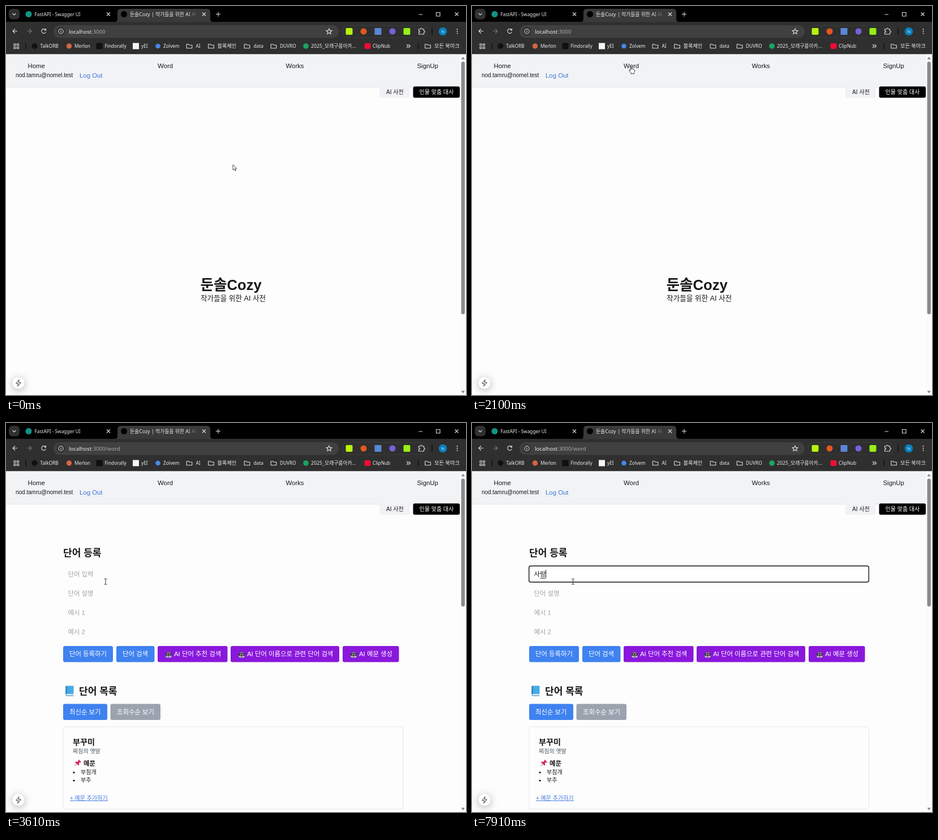
An HTML page that plays this animation: 813x689 px, repeating every 8000 ms.

```html
<!DOCTYPE html>
<html lang="ko">
<head>
<meta charset="utf-8">
<title>Word registration</title>
<style>
  html, body { margin: 0; width: 100%; height: 100%; overflow: hidden; background: #fdfdfd; }
  svg { display: block; width: 100%; height: 100%; }
  text { font-family: "Liberation Sans", "Noto Sans CJK KR", "Noto Sans CJK JP", sans-serif; font-size: 11.4px; fill: #171717; white-space: pre; }
  .ui text { font-family: "Noto Sans", "Noto Sans CJK KR", "Noto Sans CJK JP", sans-serif; font-size: 8.3px; fill: #ededed; }
  .ui .ko { font-size: 9.2px; }
  .ui .mix { font-size: 8.8px; }
  .ui .url { font-size: 9.5px; fill: #f2f2f2; }
  .ui .dim { fill: #a9a9a9; }
  .line { fill: none; stroke: #dedede; stroke-width: 1.1; }
  .small { font-size: 10px; }
  .h1 { font-size: 25.6px; font-weight: 700; }
  .h2 { font-size: 17.07px; font-weight: 700; }
  .h3 { font-size: 14.2px; font-weight: 700; }
  .bold { font-weight: 700; }
  .hint { fill: #a0a3a8; }
  .link { fill: #4078e0; }
  .light text, text.light { fill: #fff; }
</style>
</head>
<body>
<svg viewBox="0 0 813 689">
  <defs>
    <path id="folder" class="line" d="M-4.8-3.2h3.6l1.3 1.4h4.7v5.6h-9.6z" stroke-linejoin="round"/>
    <path id="cross" class="line" d="M-3-3 3 3M3-3-3 3"/>
    <g id="bot">
      <path d="M-5 1a5 5 0 0 1 10 0v2.5q0 2-2 2h-6q-2 0-2-2z" fill="#c6c9d1"/>
      <path d="M-4-2.5Q0-7.5 4-2.5z" fill="#6c6870"/>
      <rect x="-5.6" y="-2.2" width="11.2" height="4.6" rx="1.8" fill="#35323c"/>
      <circle cx="-2" cy="0" r="1" fill="#e9edf2"/><circle cx="2" cy="0" r="1" fill="#e9edf2"/>
      <path d="M-2 4h4" stroke="#5b5862"/>
    </g>
    <linearGradient id="tabFade" x1="0" x2="1">
      <stop offset="0" stop-color="#3a3a3a" stop-opacity="0"/><stop offset="1" stop-color="#3a3a3a"/>
    </linearGradient>
    <linearGradient id="edge" x1="0" x2="0" y1="0" y2="1">
      <stop offset="0" stop-color="#dfe1e4"/><stop offset="1" stop-color="#fdfdfd"/>
    </linearGradient>
    <filter id="soft" x="-100%" y="-100%" width="300%" height="300%"><feGaussianBlur stdDeviation="6"/></filter>
  </defs>

  <rect width="813" height="689" fill="#fdfdfd"/>

  <!-- Browser window -->
  <g class="ui">
    <rect width="813" height="29" fill="#000"/>
    <rect y="28" width="813" height="57.5" fill="#2f2f2f"/>
    <path d="M191 28.5q6 0 6-6V11q0-6 6-6h152q6 0 6 6v11.500q0 6 6 6z" fill="#3a3a3a"/>
    <rect x="5" y="5" width="19" height="18.500" rx="6" fill="#303030"/>
    <path class="line" d="M11.500 13l3 3 3-3"/>
    <circle cx="40" cy="14.500" r="5.500" fill="#109485"/>
    <text x="50.500" y="18.300">FastAPI - Swagger UI</text>
    <use href="#cross" x="181" y="14.500"/>
    <circle cx="208.500" cy="14.500" r="5.500" fill="#000"/>
    <text class="mix" x="219" y="18.300">둔솔Cozy | 작가들을 위한 AI 사</text>
    <rect x="320" y="6" width="20" height="20" fill="url(#tabFade)"/>
    <use href="#cross" x="350" y="14.500"/>
    <path class="line" d="M371 14.500h8M375 10.500v8M729.500 15h6.500M760.500 11.500h6.500v6.500h-6.500z"/>
    <use href="#cross" x="796.500" y="14.500"/>

    <path class="line" d="M20 44.500h-8M16 40.500l-4 4 4 4"/>
    <path class="line" d="M37 44.500h8M41 40.500l4 4-4 4" style="stroke:#777"/>
    <path class="line" d="M70 42.300a3.900 3.900 0 1 0 .4 3.600M70.500 40v3h-3"/>
    <rect x="84" y="34" width="504" height="22.500" rx="11.250" fill="#404040"/>
    <circle cx="97" cy="45" r="7.500" fill="#303030"/>
    <circle class="line" cx="97" cy="45" r="4.200"/>
    <path class="line" d="M97 44.300v3M97 42.400v1"/>
    <text class="url" x="111" y="48.500">localhost<tspan class="dim">:3000</tspan><tspan class="dim" id="route">/word</tspan></text>
    <path class="line" d="M571 40.200l1.400 3.200 3.500.3-2.700 2.300.9 3.400-3.100-1.900-3.100 1.900.9-3.400-2.700-2.300 3.500-.3z"/>
    <rect x="594.500" y="34.500" width="151" height="21.500" rx="10.750" fill="none" stroke="#3c3c3c"/>
    <rect x="600.500" y="39" width="12" height="12" rx="2" fill="#b6f20c"/>
    <circle cx="632" cy="45" r="5.500" fill="#e2571f"/>
    <rect x="651.500" y="39" width="12" height="12" rx="1" fill="#5a87d6"/>
    <circle cx="683" cy="45" r="5.500" fill="#7064dc"/>
    <rect x="702.500" y="39" width="12" height="12" rx="2" fill="#97ef16"/>
    <path class="line" d="M729.500 41h3q0-2 1.500-2t1.500 2h3v3q2 0 2 1.500t-2 1.500v3h-9v-3.300q2 0 2-1.300t-2-1.300z"/>
    <path d="M753 39v12" stroke="#111" stroke-width="1.500"/>
    <circle cx="772" cy="45" r="7.300" fill="#087fbd"/>
    <text x="772" y="47.800" text-anchor="middle" style="font-size:7.500px">N</text>
    <g fill="#e4e4e4"><circle cx="797.500" cy="41" r="1"/><circle cx="797.500" cy="44.700" r="1"/><circle cx="797.500" cy="48.400" r="1"/></g>

    <path class="line" d="M14 67h3v3h-3zM19.500 67h3v3h-3zM14 72.500h3v3h-3zM19.500 72.500h3v3h-3z"/>
    <path d="M35 65.500v11M728.500 65.500v11" stroke="#111" stroke-width="1.500"/>
    <circle cx="50.500" cy="71" r="5" fill="#111"/><text x="60.500" y="74">TalkORB</text>
    <circle cx="111.500" cy="71" r="4.700" fill="#d5663f"/><text x="121" y="74">Merlon</text>
    <rect x="159.500" y="65.500" width="11" height="11" fill="#101010"/><text x="174.500" y="74">Findorally</text>
    <rect x="224" y="65.500" width="11" height="11" fill="#f5f5f5"/><text x="239" y="74">yEI</text>
    <circle cx="268.500" cy="71" r="4.300" fill="#4688e8"/><text x="278" y="74">Zolvem</text>
    <use href="#folder" x="324" y="71"/><text x="335.500" y="74">AI</text>
    <use href="#folder" x="362.500" y="71"/><text class="ko" x="373.500" y="74">블록체인</text>
    <use href="#folder" x="426" y="71"/><text x="437.500" y="74">data</text>
    <use href="#folder" x="473" y="71"/><text x="484" y="74">DUVRO</text>
    <circle cx="530" cy="71" r="4.800" fill="#1da462"/><text class="mix" x="539" y="74">2025_모래구름아카...</text>
    <rect x="633.500" y="66" width="11" height="10" rx="2" fill="#f00d36"/><text x="648" y="74">ClipNub</text>
    <path class="line" d="M708 68l3 3-3 3M711.500 68l3 3-3 3"/>
    <use href="#folder" x="745.500" y="71"/><text class="ko" x="757" y="74">모든 북마크</text>
  </g>

  <!-- Site header -->
  <rect y="85.500" width="802.500" height="57.500" fill="#f1f3f5"/>
  <rect y="143" width="802.500" height="2" fill="url(#edge)"/>
  <text x="38.500" y="109.500">Home</text>
  <text x="268" y="109.500">Word</text>
  <text x="494.500" y="109.500">Works</text>
  <text x="726.500" y="109.500">SignUp</text>
  <text class="small" x="17" y="126">nod.tamru@nomel.test</text>
  <text class="link" x="130" y="126.500">Log Out</text>
  <rect x="660" y="143" width="53.500" height="19.500" rx="3" fill="#f1f2f5"/>
  <text class="small" x="672" y="156">AI 사전</text>
  <rect x="719.500" y="142.500" width="82.500" height="20" rx="3" fill="#000"/>
  <text class="small light" x="730.500" y="156">인물 맞춤 대사</text>

  <g id="homePage">
    <text class="h1" x="343.500" y="502.500">둔솔Cozy</text>
    <text x="344" y="522" style="font-size:12.600px">작가들을 위한 AI 사전</text>
  </g>

  <g id="wordPage">
    <text class="h2" x="101" y="236">단어 등록</text>
    <rect id="focus" x="100.700" y="253.200" width="600.600" height="28.600" rx="3" fill="#fff" stroke="#151515" stroke-width="1.400"/>
    <text class="hint" id="wordHint" x="109.500" y="271.500">단어 입력</text>
    <text id="typed" x="109.500" y="271.500"></text>
    <rect id="underline" width="10" height="1" fill="#222"/>
    <rect id="caret" y="260" width="1" height="14" fill="#111"/>
    <text class="hint" x="109.500" y="305.500">단어 설명</text>
    <text class="hint" x="109.500" y="339.500">예시 1</text>
    <text class="hint" x="109.500" y="373.500">예시 2</text>

    <g fill="#3f82f0">
      <rect x="101" y="395" width="88" height="28.500" rx="3"/>
      <rect x="195" y="395" width="67.500" height="28.500" rx="3"/>
      <rect x="101" y="497.500" width="78" height="28.500" rx="3"/>
    </g>
    <g fill="#8a18dc">
      <rect x="268" y="395" width="123.500" height="28.500" rx="3"/>
      <rect x="397" y="395" width="192" height="28.500" rx="3"/>
      <rect x="595" y="395" width="99.500" height="28.500" rx="3"/>
    </g>
    <rect x="184.500" y="497.500" width="88.500" height="28.500" rx="3" fill="#9ca3af"/>
    <use href="#bot" x="287.500" y="410"/><use href="#bot" x="416.500" y="410"/><use href="#bot" x="614.500" y="410"/>
    <g class="light">
      <text x="112" y="413.300">단어 등록하기</text>
      <text x="206" y="413.300">단어 검색</text>
      <text x="297" y="413.300">AI 단어 추천 검색</text>
      <text x="426" y="413.300">AI 단어 이름으로 관련 단어 검색</text>
      <text x="624" y="413.300">AI 예문 생성</text>
      <text x="112" y="515.500">최신순 보기</text>
      <text x="196" y="515.500">조회수순 보기</text>
    </g>

    <path d="M105.500 467q0-1.500 1.500-1.500h12.500v14.500h-12.500q-1.500 0-1.500 1.500z" fill="#45ace6"/>
    <path d="M105.500 467q0-1.500 2-1.500v14.500q-2 0-2 1.500z" fill="#2378b8"/>
    <path d="M106.500 480.500h13v2h-13z" fill="#dce8f2"/>
    <path d="M119.500 483h-12.500q-1.500 0-1.500-1.500" fill="none" stroke="#2378b8"/>
    <text class="h2" x="129" y="480.500">단어 목록</text>

    <rect x="101" y="538" width="600.500" height="146" rx="4" fill="#fdfdfd" stroke="#e4e6ec"/>
    <text class="h3" x="118" y="569.500">부꾸미</text>
    <text class="small" x="118" y="585" style="fill:#4b5563">찌짐의 옛말</text>
    <g transform="translate(126.500 602.500) rotate(45)">
      <path d="M0 2v5" stroke="#8a929c"/>
      <path d="M-3-6h6v1.800h-1.200v2.700q2.700 1 2.700 3.500h-9q0-2.500 2.700-3.500v-2.700H-3z" fill="#d92661"/>
    </g>
    <text class="bold" x="137" y="607">예문</text>
    <circle cx="120" cy="619" r="1.500"/><text class="small" x="132" y="621.800">부침개</text>
    <circle cx="120" cy="633.300" r="1.500"/><text class="small" x="132" y="636">부추</text>
    <text class="small link" x="113" y="667.500" text-decoration="underline">+ 예문 추가하기</text>
  </g>

  <!-- Scrollbar and corner badge -->
  <rect x="802.500" y="85.500" width="10.500" height="603.500" fill="#fbfbfb"/>
  <path d="M804.500 94.500l3.200-4.500 3.200 4.500zM804.500 681.500l3.200 4.500 3.200-4.500z" fill="#858585"/>
  <rect id="thumb" x="804.500" y="98.500" width="6.500" rx="3.200" fill="#8a8a8a"/>
  <circle cx="22" cy="670" r="13" fill="#9aa0aa" opacity=".5" filter="url(#soft)"/>
  <circle cx="22" cy="667.500" r="10.500" fill="#fff"/>
  <path d="M23 662l-5.200 6.500h3.700l-.8 5 5.500-6.700h-3.800z" fill="none" stroke="#555" stroke-width="1.100" stroke-linejoin="round"/>

  <g id="cursor">
    <path id="arrow" d="M0 0v9.500l2.300-2 1.600 3.500 1.500-.7-1.600-3.300h3z" fill="#fff" stroke="#222" stroke-width=".8"/>
    <path id="hand" d="M-1 1q0-1.400 1-1.400T1 1v4l.2-1q1.700-.5 1.900.8 1.500-.5 1.700.8 1.600-.3 1.600 1.200v2.200q0 1.600-1 2.500V13H0v-1.600L-3.200 7.500q-.3-1.500 1-1.300L-1 7.300z" fill="#fff" stroke="#222" stroke-width=".9"/>
    <path id="beam" d="M-2.500-5q2 0 2.500.8.5-.8 2.500-.8M0-4.200v8.400M-2.500 5q2 0 2.500-.8.500.8 2.500.8" fill="none" stroke="#333" stroke-width="1"/>
  </g>
</svg>
<script>
const LOOP = 8000, NAVIGATE = 2170, FOCUS = 4310;
const part = id => document.getElementById(id);
const show = (id, on) => part(id).setAttribute("display", on ? "inline" : "none");
const put = (id, attrs) => { for (const k in attrs) part(id).setAttribute(k, attrs[k]); };

// Pointer stops: time, x, y
const path = [
  [0, 401, 281], [470, 401, 281], [640, 296, 106], [770, 290, 107], [940, 290, 107],
  [1070, 281, 107], [2540, 281, 107], [2840, 333, 116], [3340, 190, 262],
  [3610, 176, 281], [3940, 176, 281], [3970, 178.5, 281], [LOOP, 178.5, 281]
];
// Composed text: time, string; the caret blink restarts at each entry
const typing = [[FOCUS, ""], [5970, "ㅅ"], [6110, "사"], [7410, "살"], [7740, "사라"], [7910, "사랑"]];

function pointerAt(t) {
  const i = path.findIndex(stop => stop[0] > t);
  const [t0, x0, y0] = path[i - 1], [t1, x1, y1] = path[i];
  const u = (t - t0) / (t1 - t0), e = u * u * (3 - 2 * u);
  return [x0 + (x1 - x0) * e, y0 + (y1 - y0) * e];
}

function render(t) {
  const onWord = t >= NAVIGATE, focused = t >= FOCUS;
  show("homePage", !onWord);
  show("wordPage", onWord);
  show("route", onWord);
  put("thumb", { height: onWord ? 226.5 : 447.5 });

  const [since, text] = typing.filter(step => step[0] <= t).pop() || [0, ""];
  const advance = 10.5 * text.length;
  part("typed").textContent = text;
  show("focus", focused);
  show("wordHint", !text);
  show("underline", text);
  put("underline", { x: 99.5 + advance, y: text.length > 1 ? 274.5 : 273 });
  show("caret", focused && (t - since) % 1000 < 500);
  put("caret", { x: 109 + advance });

  const [x, y] = pointerAt(t);
  const kind = t > 600 && t < 2570 ? "hand" : onWord && y > 252 ? "beam" : "arrow";
  put("cursor", { transform: `translate(${x} ${y})` });
  for (const id of ["arrow", "hand", "beam"]) show(id, id === kind);
}

const start = performance.now();
function tick() {
  render((performance.now() - start) % LOOP);
  requestAnimationFrame(tick);
}
tick();
</script>
</body>
</html>
```
